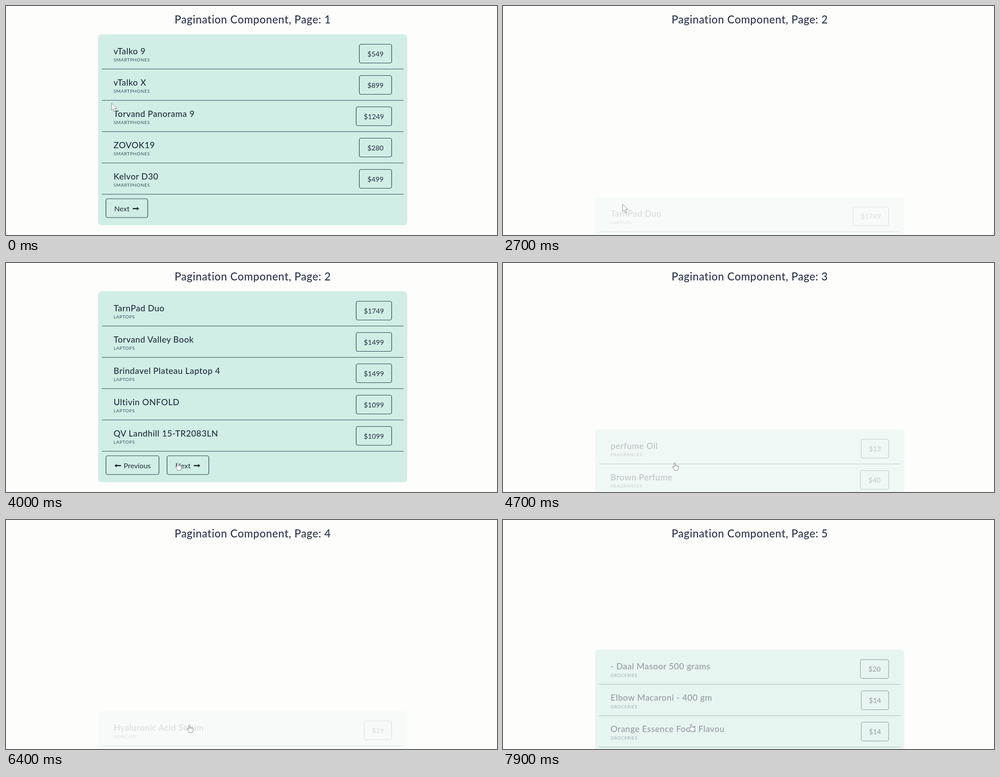
An HTML page for the animation above (8 s loop, 1093 by 512 pixels).

```html
<!DOCTYPE html>
<html lang="en">
<head>
<meta charset="utf-8">
<title>Pagination</title>
<style>
  html, body { margin: 0; width: 100%; height: 100%; overflow: hidden; background: #fdfdfc; }
  svg { display: block; width: 100%; height: 100%; }
  text { font-family: Lato, "Open Sans", sans-serif; fill: #212f40; }
  #title { font-size: 24px; font-weight: 500; letter-spacing: .6px; fill: #2b364b; }
  .name { font-size: 19px; font-weight: 500; letter-spacing: .5px; }
  .kind { font-size: 10px; letter-spacing: .65px; fill: #3b5062; }
  .price { font-size: 15.5px; }
  .label { font-size: 16px; }
  .box { fill: none; stroke: #263648; stroke-width: 1.2; }
  .rule { stroke: #4a5f6b; stroke-width: 1.1; }
  .arrow { fill: #0f1a20; }
  #cursor path { fill: #fff; stroke: #7d838c; stroke-width: 1; stroke-linejoin: round; }
</style>
</head>
<body>
<svg>
  <text id="title" x="549.3" y="38.5" text-anchor="middle"></text>
  <g id="panel"></g>
  <g id="cursor">
    <path id="pointer" d="M0 0V16.5L3.8 13L6.6 19.3L9.4 18.1L6.7 12H12Z"/>
    <g id="hand">
      <path d="M-1.3 1.2Q0-.6 1.3 1.2V6Q2.8 5 4 6.5Q5.5 5.6 6.6 7.2Q8.6 6.8 8.8 8.6V12.5Q8.6 14.5 7.4 15.6V17.5H-.3V16Q-2.6 13.5-4.6 10.4Q-5 8.4-3 8.8L-1.3 10.4Z"/>
      <path d="M1.3 6V9M4 6.5V9.3M6.6 7.2V9.6"/>
    </g>
  </g>
</svg>
<script>
const LOOP = 8000, STEP = 100, SLIDE = 750, HEIGHT = 427;

const pages = [
  ["SMARTPHONES", ["vTalko 9", 549], ["vTalko X", 899], ["Torvand Panorama 9", 1249],
    ["ZOVOK19", 280], ["Kelvor D30", 499]],
  ["LAPTOPS", ["TarnPad Duo", 1749], ["Torvand Valley Book", 1499], ["Brindavel Plateau Laptop 4", 1499],
    ["Ultivin ONFOLD", 1099], ["QV Landhill 15-TR2083LN", 1099]],
  ["FRAGRANCES", ["perfume Oil", 13], ["Brown Perfume", 40], ["Dew Scent Velluria Perfume", 13],
    ["Non-Alcoholic Concentrated Perfume Oil", 120], ["Eau De Perfume Spray", 30]],
  ["SKINCARE", ["Hyaluronic Acid Serum", 19], ["Tree Oil 30ml", 12], ["Oil Free Moisturizer 100ml", 40],
    ["Skin Beauty Serum.", 46], ["Freckle Treatment Cream- 15gm", 70]],
  ["GROCERIES", ["- Daal Masoor 500 grams", 20], ["Elbow Macaroni - 400 gm", 14], ["Orange Essence Food Flavou", 14]]
];
const clicks = [2450, 4391.8, 6150, 7532.8];

// time, x, y of the cursor's hot spot
const track = [
  [0, 235, 217], [1300, 266, 443], [3400, 266, 443], [4000, 382, 446], [4900, 382, 446],
  [5400, 405, 458], [6200, 405, 458], [6900, 418.5, 455.5], [LOOP, 418.5, 455.5]
];

const $ = id => document.getElementById(id);
const label = (cls, x, y, s, anchor = "start") =>
  `<text class="${cls}" x="${x}" y="${y}" text-anchor="${anchor}">${s}</text>`;
const box = (x, y, w) => `<rect class="box" x="${x}" y="${y}" width="${w}" height="42" rx="4"/>`;
const arrow = (x, dir) =>
  `<path class="arrow" transform="translate(${x} 453) scale(${dir} 1)" d="M-7-1.2H2.5V-3.7L7.3 0L2.5 3.7V1.2H-7Z"/>`;

function row([name, price], kind, i) {
  const y = 70 * i, s = "$" + price;
  // the digit 1 is narrower than the others
  const w = 36 + 9 * s.length - 2 * (s.split("1").length - 1);
  return label("name", 239.5, 107.5 + y, name) + label("kind", 239.5, 124 + y, kind) +
    box(858.5 - w, 85.5 + y, w) + label("price", 858.5 - w / 2, 112.5 + y, s, "middle") +
    `<path class="rule" d="M213.5 ${140.9 + y}H885"/>`;
}

const next = x => box(x, 431, 93) + label("label", x + 18.5, 458.7, "Next") + arrow(x + 66.5, 1);
const previous = () => box(222.5, 431, 118) + arrow(249, -1) + label("label", 262, 458.7, "Previous");

function build(n) {
  const [kind, ...items] = pages[n];
  $("title").textContent = "Pagination Component, Page: " + (n + 1);
  $("panel").innerHTML = `<rect x="205" y="63.3" width="688.3" height="${HEIGHT}" rx="8" fill="#d0eee6"/>` +
    items.map((item, i) => row(item, kind, i)).join("") +
    (n ? previous() + next(358.5) : next(222.5));
}

const inOut = x => x < .5 ? 4 * x ** 3 : 1 - 4 * (1 - x) ** 3;
const smooth = x => x * x * (3 - 2 * x);

function cursorAt(t) {
  const i = track.findIndex(k => k[0] > t);
  const [t0, x0, y0] = track[i - 1], [t1, x1, y1] = track[i];
  const p = smooth((t - t0) / (t1 - t0));
  return [x0 + (x1 - x0) * p, y0 + (y1 - y0) * p];
}

let shown = -1;
function draw(now) {
  const t = Math.floor(now % LOOP / STEP) * STEP;
  const page = clicks.filter(c => c <= t).length;
  if (page !== shown) build(shown = page);

  const p = page ? inOut(Math.min(1, (t - clicks[page - 1]) / SLIDE)) : 1;
  $("panel").setAttribute("transform", `translate(0 ${HEIGHT * (1 - p)})`);
  $("panel").setAttribute("opacity", p);

  const [x, y] = cursorAt(t);
  const stale = t >= 2600 && t < 3500, gap = x > 341 && x < 358;
  const hand = y > 431 && !stale && !gap;
  $("cursor").setAttribute("transform", `translate(${x} ${y})`);
  $("hand").style.display = hand ? "" : "none";
  $("pointer").style.display = hand ? "none" : "";
}

const start = performance.now();
function tick() {
  draw(performance.now() - start);
  requestAnimationFrame(tick);
}
tick();
</script>
</body>
</html>
```
